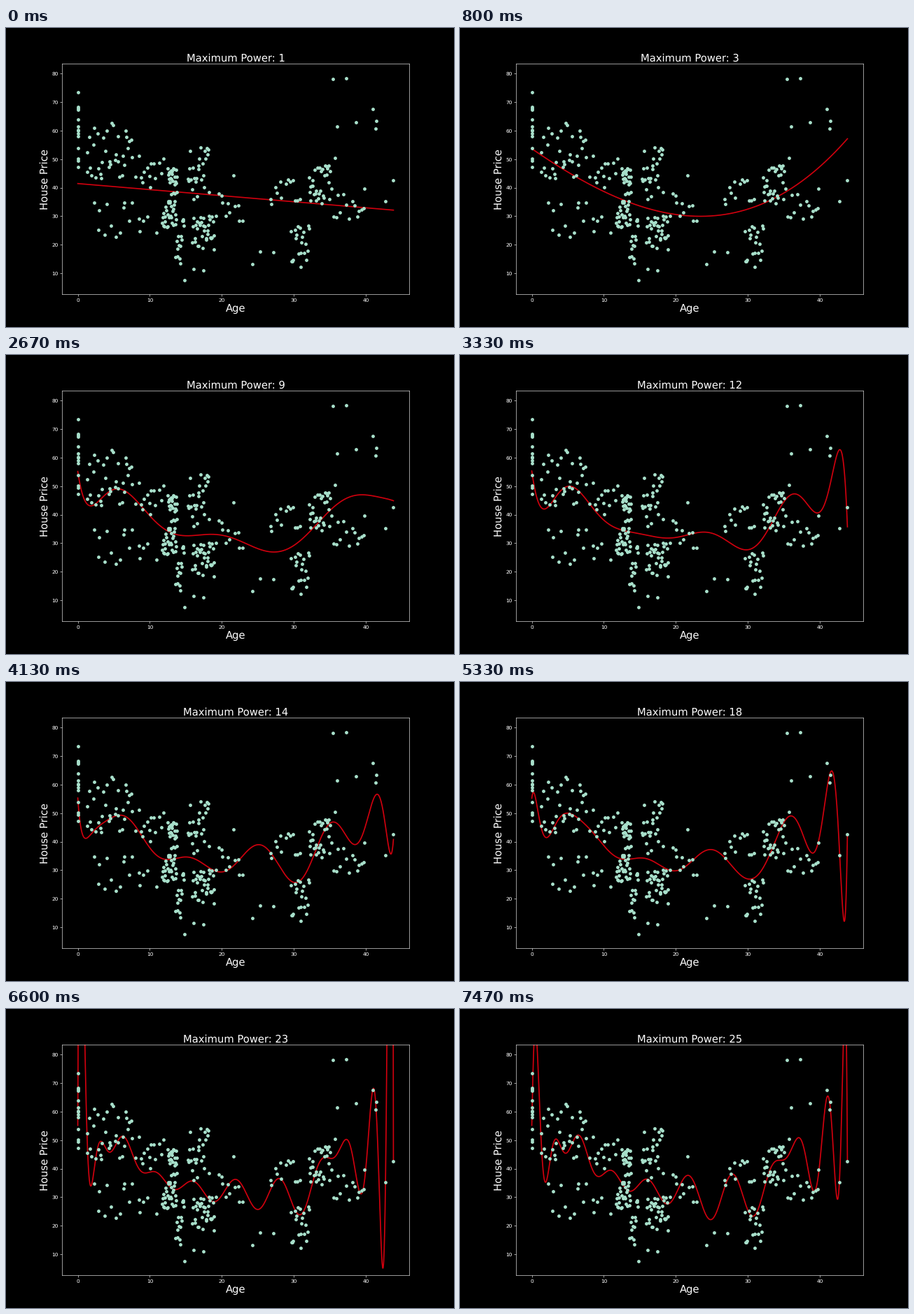
Animation, 640 px wide and 428 px high, one loop 7.54 s. Source, as a matplotlib script:

```python
import numpy as np
import matplotlib.pyplot as plt
from matplotlib.animation import FuncAnimation

FRAMES, INTERVAL = 377, 20
HOLD = 15                      # frames per power
MAX_POWER, MAX_AGE = 25, 43.8
K = 5 / 6                      # scale of all point sizes
NUDGE = 0.9
MINT, RED = "#a8e0cb", "#d0000e"

# Houses standing apart: (age, price)
LONE = [
    (14.8, 7.5), (16.1, 11.6), (17.4, 11.1), (24.2, 13.3), (25.3, 17.6),
    (27.1, 17.3), (30.9, 12.2), (35.4, 78.1), (37.2, 78.4), (36, 61.4),
    (35.7, 50.5), (38.6, 62.8), (39.8, 39.6), (40.9, 67.6), (41.3, 60.7),
    (41.4, 63.3), (42.7, 35.2), (43.8, 42.7),
]

# Crowds: count, age range, price range
CROWDS = [
    (14, 0, 0, 43, 74), (34, 1.1, 7.5, 43, 63), (18, 1.9, 11, 22, 42),
    (14, 7.5, 12, 40, 54), (24, 12.5, 13.8, 37, 48),
    (28, 11.7, 13.6, 26, 36), (16, 13.5, 14.8, 13, 30),
    (26, 15.2, 18.3, 36, 55), (34, 15.9, 19, 17, 31), (12, 19, 23, 22, 47),
    (13, 26.4, 31, 34, 43), (20, 29.5, 32.2, 14, 27),
    (32, 32, 35.2, 34, 48), (13, 35.4, 39.8, 29, 40),
]

# Turning points of the most flexible curve: (age, price)
TURNS = [
    (0, 55.2), (.5, 84.5), (1.1, 54), (1.8, 35), (3.3, 50.7), (4.6, 45.3),
    (6.4, 51.7), (9.2, 37.2), (10.9, 39.4), (13.7, 32), (15.9, 36.5),
    (18.9, 27.5), (21.7, 37.9), (24.8, 22), (27.9, 38.4), (30.6, 23.3),
    (34, 43.1), (34.9, 42.8), (37.1, 50.9), (39.3, 32), (41.1, 65.9),
    (42.5, 29.3), (43.53, 98), (43.8, 42.7),
]


def houses():
    rng = np.random.default_rng(11)
    parts = [np.array(LONE)]
    for n, x0, x1, y0, y1 in CROWDS:
        ages = x0 + (x1 - x0) * (np.arange(n) + rng.random(n)) / n
        parts.append(np.column_stack([ages, rng.uniform(y0, y1, n)]))
    return np.vstack(parts)


def trend(x):
    """Cubic ease from each turning point to the next."""
    kx, ky = np.array(TURNS).T
    i = np.clip(np.searchsorted(kx, x, side="right") - 1, 0, len(kx) - 2)
    t = (x - kx[i]) / (kx[i + 1] - kx[i])
    return ky[i] + (ky[i + 1] - ky[i]) * t * t * (3 - 2 * t)


def fits(ages, x):
    """Polynomial regressions of the trend, one for each power."""
    grid = np.linspace(0, MAX_AGE, 220)
    at = np.concatenate([ages, grid])
    # A faint pull on the grid tames the gaps between houses
    weight = np.concatenate([np.ones(len(ages)), np.full(len(grid), 0.03)])
    return [np.polynomial.Chebyshev.fit(at, trend(at), power, w=weight,
                                        domain=[0, MAX_AGE])(x)
            for power in range(1, MAX_POWER + 1)]


data = houses()
xs = np.linspace(0, MAX_AGE, 1400)
curves = fits(data[:, 0], xs)

plt.rcParams.update({
    "font.family": "DejaVu Sans",
    "text.hinting": "none",
    "text.color": "white",
    "axes.labelcolor": "white",
    "axes.edgecolor": "white",
    "axes.linewidth": 0.8 * K,
    "axes.labelpad": 4 * K - NUDGE,
    "axes.labelsize": 20 * K,
    "axes.titlepad": 6 * K - NUDGE,
    "axes.titlesize": 20 * K,
})
for axis, shift in (("xtick", NUDGE), ("ytick", 0)):
    plt.rcParams.update({
        f"{axis}.color": "white",
        f"{axis}.labelsize": 10 * K,
        f"{axis}.major.size": 3.5 * K,
        f"{axis}.major.width": 0.8 * K,
        f"{axis}.major.pad": 3.5 * K + shift,
    })

fig = plt.figure(figsize=(10, 6.6875), dpi=64, facecolor="black")
ax = fig.add_axes([0.125, 0.11, 0.775, 0.77], facecolor="black")
ax.set_xlim(-2.19, 45.99)
ax.set_ylim(2.7, 83.4)
ax.set_xticks(range(0, 41, 10))
ax.set_yticks(range(10, 81, 10))
ax.set_xlabel("Age")
ax.set_ylabel("House Price")
title = ax.set_title("")
ax.scatter(*data.T, s=30, color=MINT, linewidths=0, zorder=3)
line, = ax.plot([], [], color=RED, lw=1.9, zorder=2)


def draw(frame):
    power = min(frame // HOLD + 1, MAX_POWER)
    line.set_data(xs, curves[power - 1])
    title.set_text(f"Maximum Power: {power}")
    return line, title


anim = FuncAnimation(fig, draw, frames=FRAMES, interval=INTERVAL,
                     repeat=True, repeat_delay=0, blit=False)
plt.show()
```
